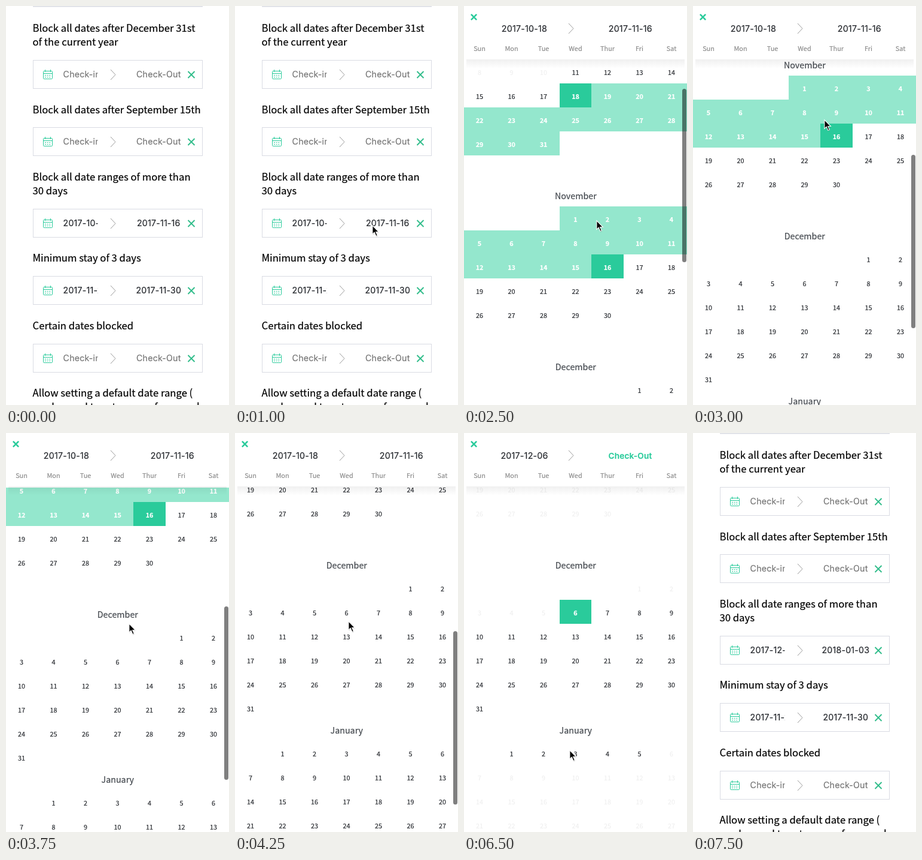
Animation of 373 by 665 pixels, one loop 8000 ms. Source, as an HTML page:

```html
<!DOCTYPE html>
<html lang="en">
<head>
<meta charset="utf-8">
<title>Date range picker</title>
<style>
  html, body { margin: 0; width: 100%; height: 100%; overflow: hidden; background: #fff; }
  svg { display: block; }
  text { font-family: "Noto Sans CJK JP", "Noto Sans CJK SC", "Noto Sans", sans-serif; stroke-width: .2px; white-space: pre; }
  .ui { font-family: Inter, Roboto, sans-serif; letter-spacing: .2px; }
  .mid { text-anchor: middle; }
  .line { fill: none; }
</style>
</head>
<body>
<svg id="stage" width="373" height="665" viewBox="0 0 373 665"></svg>
<script>
const LOOP = 8000, STEP = 250;
const TEAL = '#2acb9b', PALE = '#94e7cd', INK = '#25282d', MUTED = '#efefef';
const OPEN_AT = 1500, PICK_AT = 4750, CLOSE_AT = 6750;
const stage = document.getElementById('stage');

// Keyframes: [time, ...values]
const SCROLL = [[1750, 0], [2000, 6], [2250, 32], [2500, 87], [2750, 205], [3000, 305],
  [3250, 360], [3500, 382], [3750, 386], [4000, 430], [4250, 468]];
const POINTER = [[500, 185, 436], [750, 250, 395], [1000, 230, 366], [1750, 230, 366],
  [2500, 222, 358], [3000, 220, 190], [3750, 206, 318], [4250, 190, 314], [4750, 182, 306],
  [5250, 182, 306], [6500, 177, 529], [6750, 176, 532]];

function track(keys, t) {
  if (t <= keys[0][0]) return keys[0].slice(1);
  const next = keys.findIndex(k => k[0] > t);
  if (next < 0) return keys[keys.length - 1].slice(1);
  const a = keys[next - 1], b = keys[next], f = (t - a[0]) / (b[0] - a[0]);
  return a.slice(1).map((v, i) => v + (b[i + 1] - v) * f);
}

const text = (x, y, str, size, color, cls = '', weight = 400) =>
  `<text x="${x}" y="${y}" font-size="${size}" fill="${color}" stroke="${color}" class="${cls}" font-weight="${weight}">${str}</text>`;
const rect = (x, y, w, h, fill) => `<rect x="${x}" y="${y}" width="${w}" height="${h}" fill="${fill}"/>`;
const line = (d, color, width) => `<path class="line" d="${d}" stroke="${color}" stroke-width="${width}"/>`;
const cross = (x, y, r, width, color) =>
  line(`M${x - r} ${y - r}l${2 * r} ${2 * r}m0 ${-2 * r}l${-2 * r} ${2 * r}`, color, width);
const chevron = y => line(`M175 ${y - 8.5}l8 8.5l-8 8.5`, '#9a9a9a', 1);

// ---- Form page ----
const HEADINGS = [
  [43, 'Block all dates after December 31st'], [66, 'of the current year'],
  [179, 'Block all dates after September 15th'],
  [291, 'Block all date ranges of more than'], [314, '30 days'],
  [426, 'Minimum stay of 3 days'], [539, 'Certain dates blocked'],
  [651, 'Allow setting a default date range ('], [674, 'can be used to set a range from a url'],
];

function calendarIcon(y) {
  let dots = '';
  for (let row = 0; row < 2; row++)
    for (let col = 0; col < 3; col++) dots += `M${65 + col * 3.6} ${y + 9.5 + row * 3}h2`;
  return `<rect class="line" x="62.5" y="${y + 2.5}" width="15" height="13" rx="1" stroke="${TEAL}"/>`
    + line(`M62.5 ${y + 6.5}h15M65.5 ${y}v4M74.5 ${y}v4`, TEAL, 1) + line(dots, TEAL, 1);
}

function field(y, from, to) {
  const color = s => s.startsWith('Check') ? '#757575' : INK;
  return `<rect class="line" x="45.5" y="${y + .5}" width="283" height="47" stroke="#d9dbe3"/>`
    + calendarIcon(y + 16)
    + `<svg x="95" y="${y}" width="58.5" height="48">${text(.6, 29, from, 14.2, color(from), 'ui')}</svg>`
    + chevron(y + 24.5) + text(255.3, y + 29, to, 14.2, color(to), 'ui mid')
    + cross(310, y + 24.5, 5.5, 2, '#32bd8b');
}

function formPage(picked) {
  const range = picked ? ['2017-12-06', '2018-01-03'] : ['2017-10-18', '2017-11-16'];
  return rect(45, 0, 284, 1.5, '#d9dbe3')
    + HEADINGS.map(([y, s]) => text(44.5, y, s, 16.7, '#000')).join('')
    + field(90, 'Check-in', 'Check-Out') + field(202, 'Check-in', 'Check-Out')
    + field(338, ...range) + field(450, '2017-11-28', '2017-11-30')
    + field(563, 'Check-in', 'Check-Out');
}

// ---- Calendar ----
// top: y of the first week row; first: weekday of day 1
const MONTHS = [
  { name: 'October', code: 1000, top: 136, first: 0, days: 31 },
  { name: 'November', code: 1100, top: 421, first: 3, days: 30 },
  { name: 'December', code: 1200, top: 706, first: 5, days: 31 },
  { name: 'January', code: 1300, top: 981, first: 1, days: 31 },
];
const WEEKDAYS = ['Sun', 'Mon', 'Tue', 'Wed', 'Thur', 'Fri', 'Sat'];
const cellX = col => Math.floor(col * 53.4);
const centerX = col => col * 53.5 + 26;

function month({ name, code, top, first, days }, scroll, picked) {
  const [start, end, min, max] = picked ? [1206, 1206, 1206, 1305] : [1018, 1116, 1011, 9999];
  let out = text(186.8, top - 12 - scroll, name, 14.3, '#42474d', 'mid');
  for (let day = 1; day <= days; day++) {
    const slot = first + day - 1, col = slot % 7, y = top + 40 * Math.floor(slot / 7) - scroll;
    if (y < 45 || y > 665) continue;
    const date = code + day, chosen = date >= start && date <= end;
    if (chosen) out += rect(cellX(col), y, cellX(col + 1) - cellX(col), 40, date === start || date === end ? TEAL : PALE);
    const color = chosen ? '#fff' : date < min || date > max ? MUTED : INK;
    out += text(centerX(col), y + 26, day, 10.8, color, 'mid', chosen ? 700 : 400);
  }
  return out;
}

function calendar(t) {
  const [scroll] = track(SCROLL, t), picked = t >= PICK_AT;
  const shade = '<defs><linearGradient id="shade" x2="0" y2="1"><stop stop-opacity=".06"/>'
    + '<stop offset="1" stop-opacity="0"/></linearGradient></defs>';
  let out = shade + MONTHS.map(m => month(m, scroll, picked)).join('')
    + rect(0, 0, 373, 91, '#fff') + rect(4, 89, 365, 15, 'url(#shade)')
    + cross(16.5, 18.5, 4.6, 2.6, TEAL) + chevron(37.5)
    + text(101, 43, picked ? '2017-12-06' : '2017-10-18', 14.3, INK, 'ui mid');
  out += picked ? text(278, 43, 'Check-Out', 13.6, TEAL, 'ui mid', 600)
    : text(278.3, 43, '2017-11-16', 14.3, INK, 'ui mid');
  out += WEEKDAYS.map((d, i) => text(centerX(i), 75, d, 10.9, '#8d8d8d', 'mid')).join('');
  if (t >= 2000 && t < PICK_AT)
    out += `<rect x="365" y="${94 + scroll * .505}" width="7" height="289" rx="3.5" fill="#000" fill-opacity=".5"/>`;
  return out;
}

function pointer(t) {
  if (t < 500 || t >= 7500) return '';
  const [x, y] = track(POINTER, t);
  const arrow = 'M.7 .8v14.6l3.3-3.1l2.7 6.1l2.4-1l-2.6-5.9h4.7z';
  return `<g transform="translate(${x - .8} ${y - 1})"><path d="${arrow}" transform="translate(.6 1.3)" opacity=".18"/>`
    + `<path d="${arrow}" stroke="#fff" stroke-width="1.1"/></g>`;
}

let shown = -1;
function frame(now) {
  const t = Math.floor(now % LOOP / STEP) * STEP;
  if (t !== shown) {
    shown = t;
    const isOpen = t >= OPEN_AT && t < CLOSE_AT;
    stage.innerHTML = (isOpen ? calendar(t) : formPage(t >= CLOSE_AT)) + pointer(t);
  }
  requestAnimationFrame(frame);
}
frame(performance.now());
</script>
</body>
</html>
```
